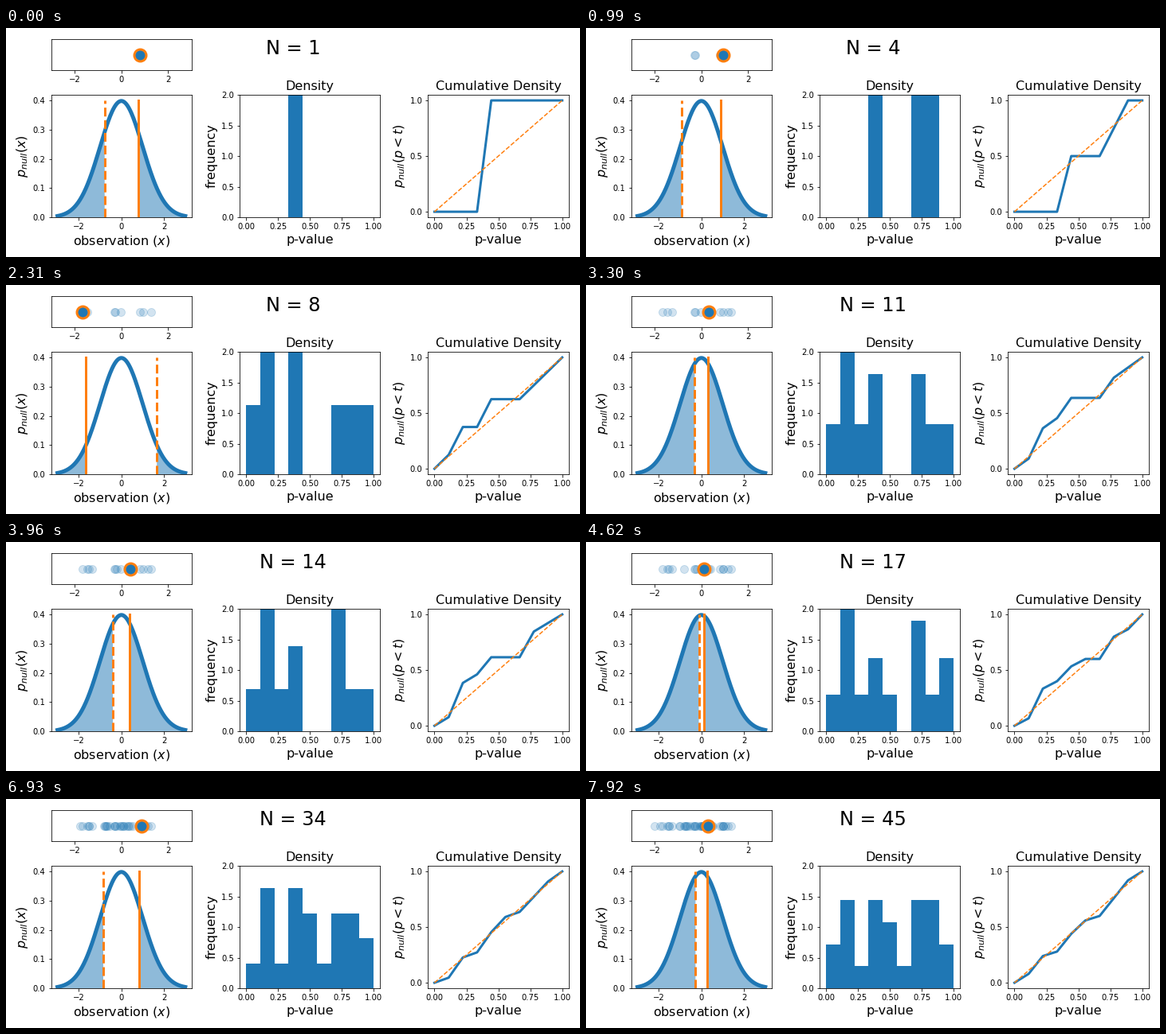
Recreate the animation shown at these times as a matplotlib script. Size 720x288 px, loop 8 s.

```python
from math import erfc, sqrt

import matplotlib.pyplot as plt
import numpy as np
from matplotlib.animation import FuncAnimation

W, H, DPI = 720, 288, 72
LOOP, STEP, HOLD = 8000, 80, 330
BLUE, ORANGE = "#1f77b4", "#ff7f0e"
BINS = 9
LEFT, PITCH, WIDTH = 56.57, 236.43, 176.3
BASE, TALL = 49.92, 154

# Sample sizes shown: whole numbers on a geometric scale
SIZES = sorted({int(1.1 ** m) for m in range(41)})

# The newest draw at each size; draws skipped in between are random
NEWEST = [0.785, -0.297, -0.27, 0.92, -0.02, -1.44, 1.27, -1.665, 1.13,
          -1.25, 0.31, -1.386, 0.4, -0.74, 0.12, 0.27, -0.67, 0.2,
          0.92, 0.49, -0.603, 0.85, -0.38, -2.0, 0.275]
draws = np.random.default_rng(3).triangular(-2.25, 0, 1.4, SIZES[-1])
draws[np.array(SIZES) - 1] = NEWEST
P_VALUES = [erfc(abs(x) / sqrt(2)) for x in NEWEST]

plt.rcParams.update({
    "font.family": "DejaVu Sans",
    "font.size": 10,
    "axes.labelsize": 16,
    "axes.titlesize": 16,
})
fig = plt.figure(figsize=(W / DPI, H / DPI), dpi=DPI, facecolor="white")


def add_axes(col, bottom, height, **props):
    left = LEFT + col * PITCH
    ax = fig.add_axes([left / W, bottom / H, WIDTH / W, height / H])
    ax.set(**props)
    return ax


def normal(x):
    return np.exp(-x ** 2 / 2) / sqrt(2 * np.pi)


quarters = np.linspace(0, 1, 5)
strip = add_axes(0, 234.6, 39, xlim=(-3, 3), ylim=(-1, 1),
                 xticks=[-2, 0, 2], yticks=[])
null = add_axes(0, BASE, TALL, xlim=(-3.3, 3.3), ylim=(0, 0.42),
                xticks=[-2, 0, 2], yticks=np.arange(5) / 10,
                xlabel="observation $(x)$", ylabel="$p_{null}(x)$")
density = add_axes(1, BASE, TALL, xlim=(-0.05, 1.05), ylim=(0, 2),
                   xticks=quarters, yticks=2 * quarters,
                   xlabel="p-value", ylabel="frequency", title="Density")
cumul = add_axes(2, BASE, TALL, xlim=(-0.05, 1.05), ylim=(-0.05, 1.05),
                 xticks=quarters, yticks=quarters[::2],
                 xlabel="p-value", ylabel="$p_{null}(p<t)$",
                 title="Cumulative Density")

heading = fig.text(0.5, 255 / H, "", fontsize=24, ha="center", va="baseline")

dots, = strip.plot([], [], "o", color=BLUE, ms=10, alpha=0.2)
newest, = strip.plot([], [], "o", mfc=BLUE, mec=ORANGE, ms=15, mew=3)

grid = np.linspace(-3, 3, 200)
null.plot(grid, normal(grid), color=BLUE, lw=5)
tails = [null.fill([0, 1, 1], [0, 0, 0], color=BLUE, alpha=0.5, lw=0)[0]
         for _ in range(2)]
seen, = null.plot([], [], color=ORANGE, lw=3)
mirrored, = null.plot([], [], "--", color=ORANGE, lw=3)

edges = np.linspace(0, 1, BINS + 1)
bars = density.bar(edges[:-1], np.zeros(BINS), 1 / BINS, align="edge",
                   color=BLUE)
steps, = cumul.plot([], [], color=BLUE, lw=3)
cumul.plot([0, 1], [0, 1], "--", color=ORANGE, lw=1.5)


def show(k):
    n, x = SIZES[k], NEWEST[k]
    heading.set_text(f"N = {n}")
    dots.set_data(draws[:n], np.zeros(n))
    newest.set_data([x], [0])

    seen.set_data([x, x], [0, 0.4])
    mirrored.set_data([-x, -x], [0, 0.4])
    t = np.linspace(abs(x), 3, 100)
    px = np.r_[t[0], t, t[-1]]
    py = np.r_[0, normal(t), 0]
    for tail, sign in zip(tails, (-1, 1)):
        tail.set_xy(np.column_stack([sign * px, py]))

    share = np.histogram(P_VALUES[:k + 1], edges)[0] / (k + 1)
    for bar, s in zip(bars, share):
        bar.set_height(s * BINS)
    steps.set_data(edges, np.r_[0, np.cumsum(share)])


def update(i):
    show(min((i * STEP + STEP - 1) // HOLD, len(SIZES) - 1))


anim = FuncAnimation(fig, update, frames=LOOP // STEP, interval=STEP,
                     init_func=lambda: show(0), repeat=True, repeat_delay=0)
plt.show()
```
